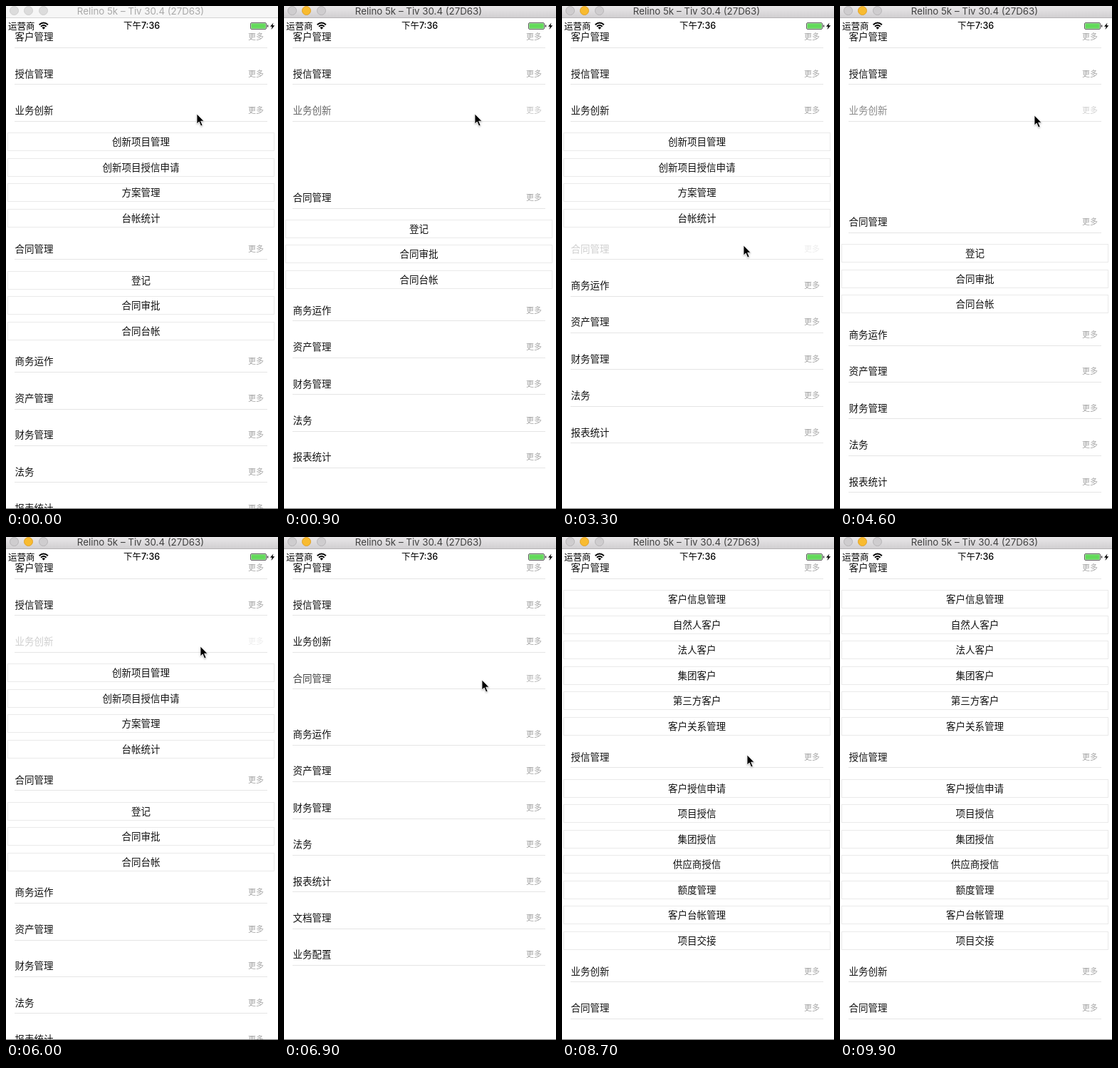
An HTML page for the animation above (10 s loop, 382 by 704 pixels).

```html
<!DOCTYPE html>
<html lang="zh-CN">
<head>
<meta charset="utf-8">
<style>
  html, body { margin: 0; width: 100%; height: 100%; overflow: hidden; background: #fff; }
  #stage {
    position: relative; width: 382px; height: 704px; overflow: hidden; background: #fff; color: #111;
    font: 13.5px/20px "Noto Sans CJK SC", "Noto Sans CJK", sans-serif; white-space: nowrap;
  }
  #stage div, #stage span, svg { position: absolute; box-sizing: border-box; }

  #bar { left: 0; top: 0; width: 382px; height: 17px; background: #f6f6f6; border-bottom: 1px solid #d4d4d4; z-index: 3; }
  #bar.active { background: linear-gradient(#e9e7e9, #d1cfd1); border-color: #b4b2b4; }
  #bar b {
    position: absolute; top: 0; width: 13px; height: 13px; border-radius: 50%;
    box-sizing: border-box; background: #dcdcdc; border: 1px solid #cfcfcf;
  }
  #bar.active b { background: #cfcdcf; border-color: #b7b5b7; }
  #bar.active b.min { background: #f8bb30; border-color: #e0a128; }
  #bar span {
    left: 0; width: 378px; top: -2px; text-align: center; color: #a9a9a9;
    font: 13.3px/18px Inter, sans-serif;
  }
  #bar.active span { color: #414141; }

  #status { left: 0; top: 17px; width: 382px; height: 19px; background: #fff; z-index: 2; }
  #status span { top: 1px; font-size: 12.5px; color: #000; }
  #status .time { left: 0; width: 381px; text-align: center; font: 500 12.5px/20px Inter, "Noto Sans CJK SC", sans-serif; }

  #list { left: 0; top: 17.7px; width: 382px; }
  #list .section { position: relative; width: 382px; overflow: hidden; }
  .head { left: 0; top: 14.7px; width: 382px; height: 20px; }
  .head .name { left: 12.5px; }
  .head .more { right: 20px; font-size: 11px; color: #a8a8a8; }
  .rule { left: 12px; top: 40.4px; width: 355px; height: 1px; background: #e5e5e5; }
  .row {
    left: 2px; width: 375px; height: 26px; line-height: 22px;
    text-align: center; border: 1px solid #eaeaea;
  }
  #edge { left: 0; top: 703px; width: 382px; height: 1px; background: #777; z-index: 3; }
  #cursor { left: 0; top: 0; z-index: 4; overflow: visible; filter: drop-shadow(0 1px 1px #0004); }
</style>
</head>
<body>
<div id="stage">
  <div id="bar">
    <b style="left:5px"></b><b class="min" style="left:25px"></b><b style="left:46px"></b>
    <span>Relino 5k – Tiv 30.4 (27D63)</span>
  </div>
  <div id="status">
    <span style="left:3px">运营商</span>
    <span class="time">下午7:36</span>
    <svg width="382" height="19" fill="none">
      <g stroke="#000" stroke-width="2">
        <path d="M46.7 9.2Q52.8 3.8 58.9 9.2M49 11.7Q52.8 8.4 56.6 11.7"/>
        <path d="M50.5 13.2Q52.8 11.3 55.1 13.2L52.8 15.8Z" fill="#000" stroke="none"/>
      </g>
      <rect x="343.5" y="6.5" width="22" height="9" rx="1.5" stroke="#333" stroke-width=".8"/>
      <rect x="344.4" y="7.4" width="20.2" height="7.2" fill="#62d95a"/>
      <path d="M367.5 9.5v3" stroke="#333" stroke-width="1.5"/>
      <path d="M375.5 6.5L371 11.8H373.7L372.5 16L377.3 10.3H374.4Z" fill="#000"/>
    </svg>
  </div>
  <div id="list"></div>
  <div id="edge"></div>
  <svg id="cursor" width="12" height="19">
    <path d="M0 0V14L3.2 11L5.7 17L8.1 16L5.6 10.2H10Z" fill="#000" stroke="#fff" stroke-width=".8"/>
  </svg>
</div>
<script>
const LOOP = 10000, HEAD = 51.4, PITCH = 35.5, SLIDE = 300, RELEASE = 270;
const $ = id => document.getElementById(id);

const menu = [
  ['客户管理', '客户信息管理 自然人客户 法人客户 集团客户 第三方客户 客户关系管理'],
  ['授信管理', '客户授信申请 项目授信 集团授信 供应商授信 额度管理 客户台帐管理 项目交接'],
  ['业务创新', '创新项目管理 创新项目授信申请 方案管理 台帐统计'],
  ['合同管理', '登记 合同审批 合同台帐'],
  ['商务运作'], ['资产管理'], ['财务管理'], ['法务'], ['报表统计'], ['文档管理'], ['业务配置']
];
const initiallyOpen = [2, 3];
const LATE_ROWS = 9, LATE_TIME = 6060;

// [release time, section]
const taps = [
  [750, 2], [1418, 2], [2450, 3], [3400, 3], [4500, 2],
  [5250, 2], [6060, 2], [6700, 3], [7600, 0], [8380, 1]
];
// [time, x, y]
const path = [
  [0, 268, 151], [1700, 268, 151], [2150, 255, 335], [3700, 255, 335], [4150, 273, 153],
  [6150, 273, 153], [6450, 278, 200], [6950, 278, 200], [7300, 270, 42], [7750, 270, 42],
  [8100, 260, 305], [8950, 260, 305], [9350, 230, -24], [LOOP, 230, -24]
];

const clamp = x => Math.min(1, Math.max(0, x));
const ease = x => x * x * (3 - 2 * x);

function add(parent, className, text = '') {
  const el = document.createElement('div');
  el.className = className;
  el.textContent = text;
  return parent.appendChild(el);
}

const sections = menu.map(([name, items], index) => {
  const el = add($('list'), 'section');
  const head = add(el, 'head');
  add(head, 'name', name);
  add(head, 'more', '更多');
  add(el, 'rule');
  const body = add(el, 'body');
  const labels = items ? items.split(' ') : [];
  labels.forEach((label, i) => {
    add(body, 'row', label).style.top = 56.7 + i * PITCH + 'px';
  });
  body.style.width = '382px';
  return {
    el, head, body, index,
    extra: labels.length * PITCH,
    taps: taps.filter(tap => tap[1] === index).map(tap => tap[0])
  };
});

function drawSection(s, t) {
  let open = initiallyOpen.includes(s.index), amount = +open, dim = 0;
  for (const release of s.taps) {
    const press = ease(clamp((t - release + 300) / 150));
    dim = Math.max(dim, press * (1 - clamp((t - release) / RELEASE)));
    if (t < release) break;
    open = !open;
    const p = ease(clamp((t - release) / SLIDE));
    amount = open ? p : 1 - p;
  }
  s.el.style.height = HEAD + s.extra * amount + 'px';
  s.head.style.opacity = 1 - 0.8 * dim;
  s.body.style.opacity = open ? amount : 0;
  s.el.style.visibility = s.index >= LATE_ROWS && t < LATE_TIME ? 'hidden' : 'visible';
}

function drawCursor(t) {
  const i = path.findIndex(p => p[0] > t);
  const [t0, x0, y0] = path[i - 1], [t1, x1, y1] = path[i];
  const p = ease((t - t0) / (t1 - t0));
  $('cursor').style.transform = `translate(${x0 + (x1 - x0) * p}px, ${y0 + (y1 - y0) * p}px)`;
}

const start = performance.now();
function draw() {
  const t = (performance.now() - start) % LOOP;
  $('bar').classList.toggle('active', t >= 500);
  sections.forEach(s => drawSection(s, t));
  drawCursor(t);
  requestAnimationFrame(draw);
}
draw();
</script>
</body>
</html>
```
